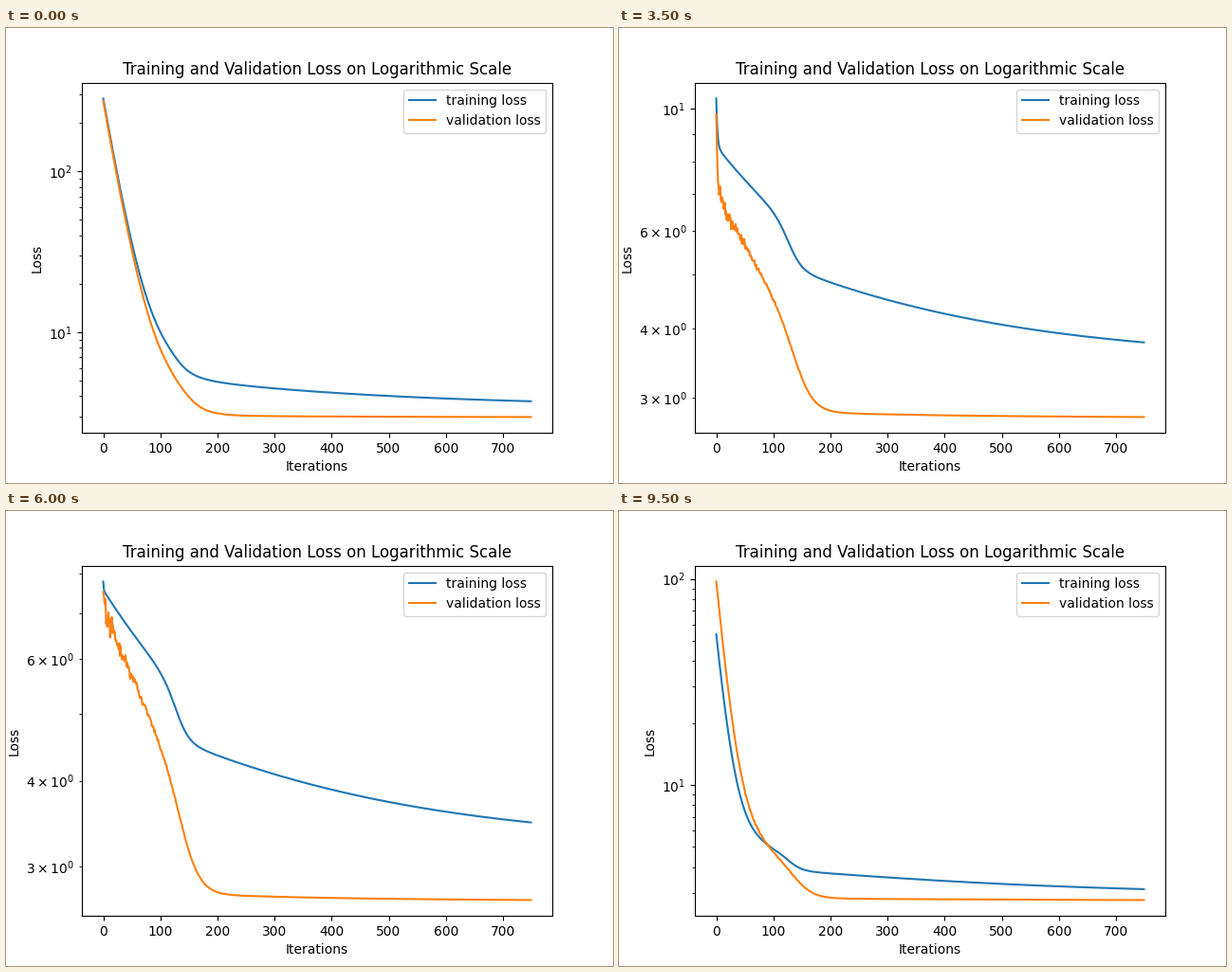
Write a matplotlib script that moves like this. It is 640 by 480 pixels and loops after 10 s.

```python
import numpy as np
import matplotlib.pyplot as plt
from matplotlib.animation import FuncAnimation

FRAMES, INTERVAL = 20, 500
T = np.arange(750)

# Initial validation loss of each run above its plateau curve
EXCESS = [267, 78, 113, 94, 160, 2, 88, 2.6, 1.2, 793,
          0.7, 95, 0.35, 118, 1.2, 1468, 107, 236, 84, 90]

# Slow trends across the runs, as a few key points
KEY_RUNS = [0, 7, 12, 16, 19]
TRAIN_EARLY = [1, 1, 0.885, 0.87, 0.735]
TRAIN_LATE = [0.985, 1, 0.925, 0.895, 0.835]
VALID_LATE = [1.074, 1, 0.971, 0.973, 1]
TRAIN_SPEED = [0.78, 0.76, 0.72, 0.485, 0.46]
VALID_SPEED = [0.78, 0.9, 0.88, 0.61, 0.64]


def plateau(floor, tail, tail_time, head, head_time, drop, width):
    """Slow exponential tail plus an early part that drops away at one point."""
    fall = 1 / (1 + np.exp((T - drop) / width))
    return floor + tail * np.exp(-T / tail_time) + head * np.exp(-T / head_time) * fall


TRAIN_BASE = plateau(3.5, 2.4, 345, 2.65, 140, 128, 12)
VALID_BASE = plateau(2.757, 0.11, 290, 4.3, 120, 139, 18)


def decay(excess, speed):
    """A larger initial excess fades more slowly."""
    kt = np.minimum(speed / np.sqrt(excess) * T, 20)
    return excess * np.exp(-kt * (1 - 0.016 * kt))


def losses(run):
    def trend(values):
        return np.interp(run, KEY_RUNS, values)

    blend = 1 - np.exp(-np.maximum(T - 100, 0) / 250)
    early, late = trend(TRAIN_EARLY), trend(TRAIN_LATE)
    train_excess = EXCESS[run] * (0.46 + 0.57 * np.exp(-run / 9))
    train = (TRAIN_BASE * (early + (late - early) * blend)
             + decay(train_excess, trend(TRAIN_SPEED)))

    scale = 1 + (trend(VALID_LATE) - 1) * np.clip((T - 75) / 75, 0, 1)
    noise = 0.03 * np.exp(-T / 45) * np.random.default_rng(run).standard_normal(T.size)
    noise[0] = 0
    valid = VALID_BASE * scale * (1 + noise) + decay(EXCESS[run], trend(VALID_SPEED))
    return train, valid


fig, ax = plt.subplots(figsize=(6.4, 4.8), dpi=100)


def draw(run):
    ax.clear()
    train, valid = losses(run)
    ax.plot(T, train, label="training loss")
    ax.plot(T, valid, label="validation loss")
    ax.set_yscale("log")
    ax.set_title("Training and Validation Loss on Logarithmic Scale")
    ax.set_xlabel("Iterations")
    ax.set_ylabel("Loss")
    ax.legend(loc="upper right")


anim = FuncAnimation(fig, draw, frames=FRAMES, interval=INTERVAL,
                     init_func=lambda: None, repeat=True, repeat_delay=0)
plt.show()
```
